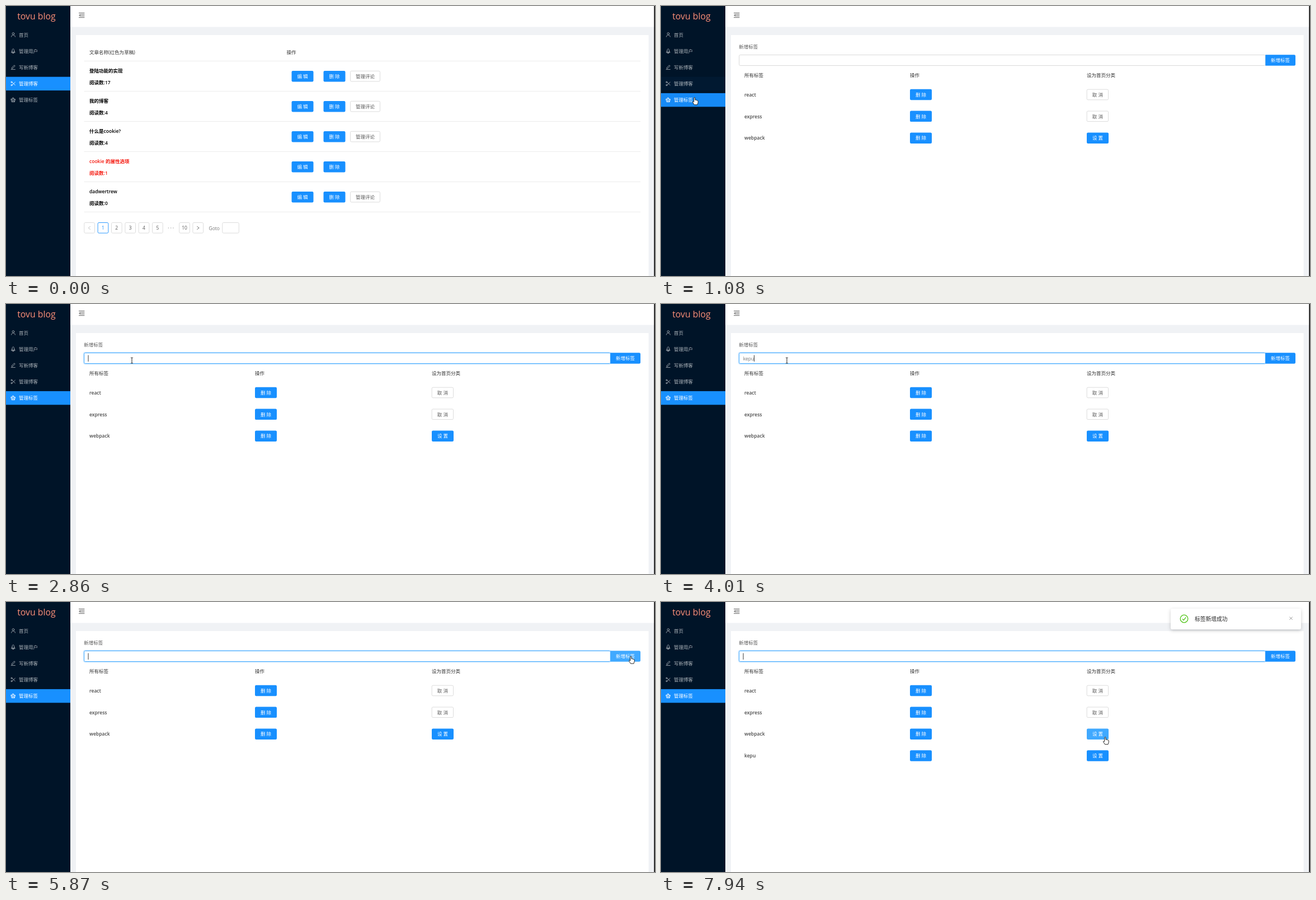
An HTML page that plays this animation: 1160x483 px, repeating every 8 s.

```html
<!DOCTYPE html>
<html lang="zh-CN">
<head>
<meta charset="utf-8">
<title>博客管理</title>
<style>
html, body { margin: 0; width: 100%; height: 100%; overflow: hidden; background: #fff; }
svg { display: block; width: 1160px; height: 483px; }
text { font: 8.53px "Open Sans", "Noto Sans CJK SC", "Noto Sans CJK", sans-serif; white-space: pre; }
.bold { font-weight: 600; }
.icon { fill: none; stroke: currentColor; stroke-width: .85; stroke-linejoin: round; stroke-linecap: round; }
</style>
</head>
<body>
<svg id="stage" viewBox="0 0 1160 483"></svg>
<script>
const LOOP = 8000, STEP = 77.16;
const BLUE = '#1890ff', HOVER = '#40a9ff', PRESSED = '#096dd9', BORDER = '#d9d9d9', GREY = '#595959', DARK = '#333';

// Drawing helpers; y of a label is its vertical centre.
const label = (x, y, s, fill = GREY, extra = '') =>
  `<text x="${x}" y="${y + 3.2}" fill="${fill}" ${extra}>${s}</text>`;
const centred = (x, y, s, fill) => label(x, y, s, fill, 'text-anchor="middle"');
const rect = (x, y, w, h, fill, extra = '') =>
  `<rect x="${x}" y="${y}" width="${w}" height="${h}" fill="${fill}" ${extra}/>`;
const frame = (x, y, w, h, stroke = BORDER) =>
  rect(x + .5, y + .5, w - 1, h - 1, '#fff', `rx="2" stroke="${stroke}" stroke-width=".9"`);
const icon = (x, y, d, color) =>
  `<path class="icon" transform="translate(${x} ${y})" color="${color}" d="${d}"/>`;
const primary = (x, y, s, id = '') =>
  rect(x, y - 9.7, 39, 19.5, BLUE, `rx="2.2" id="${id}"`) + centred(x + 19.5, y, s, '#fff');
const plain = (x, y, w, s) => frame(x, y - 9.8, w, 19.6) + centred(x + w / 2, y, s, GREY);

const menu = [
  ['首页', 'M2.1-1.8a1.9 1.9 0 1 1-3.8 0a1.9 1.9 0 1 1 3.8 0M-3.3 3.8C-3.2-.6 3.5-.6 3.6 3.8'],
  ['管理用户', 'M-1.8 1.8V-1.6Q-1.5-3.3 0-4Q1.5-3.3 1.8-1.6V1.8ZM-1.8 0L-3.2 2V2.8H3.2V2L1.8 0M-.9 4H.9'],
  ['写新博客', 'M-3.6 3.8H3.6M-2.6 2L-2.2.2L2-3.8L3.4-2.4L-.8 1.7Z'],
  ['管理博客', 'M-2-2.6L3.5 2.6M-2 2.6L3.5-2.6M-1.7-2.7a1.1 1.1 0 1 1-2.2 0a1.1 1.1 0 1 1 2.2 0M-1.7 2.7a1.1 1.1 0 1 1-2.2 0a1.1 1.1 0 1 1 2.2 0'],
  ['管理标签', 'M0-3.8L3.8-1L2.4 3.5H-2.4L-3.8-1ZM0-1.8L1.8-.4L1.1 1.6H-1.1L-1.8-.4ZM0-3.8V-1.8M3.8-1L1.8-.4M-3.8-1L-1.8-.4M2.4 3.5L1.1 1.6M-2.4 3.5L-1.1 1.6']
];
const menuY = i => 51.3 + 29.2 * i;

const sidebar = rect(0, 0, 115, 483, '#001428') +
  `<text x="54.5" y="23.5" text-anchor="middle" fill="#ff8f78" style="font-size:15.8px">tovu blog</text>` +
  rect(0, menuY(3) - 12.2, 115, 24.4, BLUE, 'id="oldItem"') +
  rect(0, menuY(4) - 12.2, 115, 24.4, BLUE, 'id="newItem"') +
  menu.map(([s, d], i) => `<g id="item${i}" opacity=".66">` +
    icon(12.8, menuY(i), d, '#fff') + label(23, menuY(i), s, '#fff') + '</g>').join('');

const shell = rect(0, 0, 1160, 483, '#f0f2f5') + rect(115, 0, 1045, 37.5, '#fff') +
  rect(125, 52, 1023.5, 431, '#fff') +
  icon(130, 12, 'M.5.5H10M4.3 3.2H10M4.3 5.9H10M.5 8.6H10M2.6 3L.7 4.6L2.6 6.2Z', '#444');

const posts = [['登陆功能的实现', 17], ['我的博客', 4], ['什么是cookie?', 4], ['cookie 的属性选项', 1], ['dadwertrew', 0]];
const rule = y => rect(139.5, y, 994.5, 1, '#ececec');
const postRow = ([name, reads], i) => {
  const y = 54 * i, draft = i === 3, color = draft ? '#f5160c' : '#000';
  return label(149, 115.3 + y, name, color, 'class="bold"') +
    label(149, 136.7 + y, '阅读数:' + reads, color, 'class="bold"') +
    primary(510.5, 125.6 + y, '编 辑') + primary(567.5, 125.6 + y, '删 除') +
    (draft ? '' : plain(615, 125.6 + y, 54, '管理评论')) + rule(152 + y);
};
const pageX = i => 139.3 + 24.35 * i;
const pager = [1, 2, 3, 4, 5].map(n =>
    frame(pageX(n), 387, 19.7, 19.7, n === 1 ? BLUE : BORDER) +
    centred(pageX(n) + 9.8, 397, n, n === 1 ? BLUE : GREY)).join('') +
  frame(pageX(0), 387, 19.7, 19.7) + icon(149, 397, 'M1.6-2.6L-1.8 0L1.6 2.6', '#bbb') +
  [290.5, 294.7, 298.9].map(x => `<circle cx="${x}" cy="397" r=".85" fill="#b5b5b5"/>`).join('') +
  frame(309.2, 387, 19.7, 19.7) + centred(319, 397, 10, GREY) +
  frame(333.4, 387, 19.7, 19.7) + icon(343.3, 397, 'M-1.6-2.6L1.8 0L-1.6 2.6', GREY) +
  label(362.5, 397.3, 'Goto', '#777') + frame(386.3, 387, 30.5, 19.7);
const postsPage = `<g id="postsPage">` + label(149, 82.8, '文章名称(红色为草稿)', DARK) +
  label(501.5, 82.8, '操作', DARK) + rule(98) + posts.map(postRow).join('') + pager + '</g>';

const tagRow = (name, i) => {
  const y = 158.5 + 38.8 * i;
  return `<g id="tag${i}">` + label(149, y, name, '#4a4a4a', 'class="bold"') + primary(445, y, '删 除') +
    (i < 2 ? plain(760.7, y, 39.3, '取 消') : primary(761, y, '设 置', 'set' + i)) + '</g>';
};
const tagsPage = `<g id="tagsPage">` + label(139.3, 73, '新增标签') +
  rect(138.7, 86.5, 942.6, 21, 'none', `rx="2.8" stroke="${BLUE}" stroke-opacity=".22" stroke-width="1.3" id="glow"`) +
  rect(139.7, 87.5, 940.6, 19, '#fff', `rx="2" stroke="${BORDER}" id="field"`) +
  label(146.8, 97.5, '', '#777', 'id="typed"') + rect(147, 91.5, .9, 11.5, '#222', 'id="caret"') +
  `<path id="add" fill="${BLUE}" d="M1080.3 87.2H1131.8q2.2 0 2.2 2.2V104.6q0 2.2-2.2 2.2H1080.3Z"/>` +
  centred(1107, 97.2, '新增标签', '#fff') +
  label(149, 123.3, '所有标签', DARK) + label(445, 123.3, '操作', DARK) + label(761, 123.3, '设为首页分类', DARK) +
  ['react', 'express', 'webpack', 'kepu'].map(tagRow).join('') + '</g>';

const notice = `<g id="notice"><g style="filter:drop-shadow(0 2px 3px rgba(0,0,0,.2))">` +
  rect(911, 12, 233, 37, '#fff', 'rx="2.4"') + '</g>' +
  `<circle cx="935" cy="30" r="6.8" fill="none" stroke="#52c41a" stroke-width="1.3"/>` +
  `<path d="M931.9 30.1L934.2 32.5L938.2 27.4" fill="none" stroke="#52c41a" stroke-width="1.3"/>` +
  `<text x="954" y="33.6" fill="#262626" style="font-size:9.75px">标签新增成功</text>` +
  icon(1126, 29.2, 'M-2.4-2.4L2.4 2.4M2.4-2.4L-2.4 2.4', '#8c8c8c') + '</g>';

// Pointer shapes have their hot spot at 0,0.
const pointers = `<g id="pointer" stroke-linejoin="round">
  <path id="arrow" fill="#fff" stroke="#111" stroke-width=".9" d="M0 0V9.6L2.2 7.6L3.7 11.2L5.3 10.5L3.8 7H6.8Z"/>
  <path id="hand" fill="#fff" stroke="#111" stroke-width=".9" d="M-1.2 8V.8Q0-.8 1 .8V4.6Q2.2 4 2.8 5Q4 4.5 4.6 5.5Q6 5.2 6.2 6.6V9.5L5 13.2H-.6L-3.5 8.4Q-3.3 6.4-1.2 8Z"/>
  <path id="beam" fill="none" stroke="#222" stroke-width="1" d="M-2-5H-.6L0-4.4L.6-5H2M0-4.4V4.4M-2 5H-.6L0 4.4L.6 5H2"/></g>`;

document.getElementById('stage').innerHTML =
  shell + sidebar + postsPage + tagsPage + notice + rect(1158.3, 0, 1.7, 483, '#111') + pointers;

const el = Object.fromEntries([...document.querySelectorAll('[id]')].map(n => [n.id, n]));
const show = (node, on) => node.setAttribute('visibility', on ? 'inherit' : 'hidden');
const clamp = v => Math.min(1, Math.max(0, v));
const smooth = v => v * v * (3 - 2 * v);

// time, x, y of the pointer
const path = [
  [70, 787, 391], [230, 600, 345], [380, 370, 270], [530, 190, 212], [690, 76, 176], [840, 60, 163.5],
  [1320, 60, 163.5], [1470, 120, 140], [1620, 205, 106], [1710, 225, 101],
  [4620, 225, 101], [4700, 330, 88], [4780, 600, 50], [4860, 930, 24], [4940, 1110, 60], [5010, 1136, 115],
  [5085, 1099, 134.5], [5250, 1099, 134.5], [5470, 1114, 108], [5550, 1117, 97],
  [6240, 1117, 97], [6470, 1116, 101], [6700, 1114, 104], [6940, 1080, 122], [7090, 1064, 125],
  [7250, 1064, 125], [7400, 990, 165], [7480, 938, 190], [7640, 830, 232], [7720, 794, 241.5], [8000, 794, 241.5]
];
const caretOn = [[1770, 2300], [2840, 3310], [3530, 4530], [5070, 5600], [5850, 6390], [6920, 7450], [7920, 8000]];
const typing = [[3530, 'k'], [3760, 'ke'], [3990, 'kepu'], [5850, '']];

function pointerAt(t) {
  const i = Math.max(1, path.findIndex(p => p[0] >= t));
  const [a, b] = [path[i - 1], path[i]];
  const k = clamp((t - a[0]) / (b[0] - a[0]));
  return [a[1] + (b[1] - a[1]) * k, a[2] + (b[2] - a[2]) * k];
}

function render(time) {
  const t = time < 64 ? 0 : 70 + STEP * Math.floor((time - 64) / STEP);
  const [x, y] = pointerAt(t);
  const inside = (x0, y0, x1, y1) => x >= x0 && x <= x1 && y >= y0 && y <= y1;
  const tags = t >= 910;
  const onMenu = inside(0, 156, 115, 180);
  const onAdd = tags && inside(1080, 87, 1134, 107);
  const onSet = tags && inside(761, 226, 800, 246);
  const onField = tags && inside(139, 87, 1080, 107);

  show(el.postsPage, !tags);
  show(el.tagsPage, tags);
  const k = 1 - (1 - clamp((t - 910) / 250)) ** 3;
  el.oldItem.setAttribute('opacity', 1 - k);
  el.newItem.setAttribute('opacity', k);
  el.item3.setAttribute('opacity', 1 - .34 * k);
  el.item4.setAttribute('opacity', tags || onMenu ? 1 : .66);

  const focused = t >= 1770 && !(t > 5600 && t < 5850);
  show(el.glow, tags && focused);
  el.field.setAttribute('stroke', focused ? HOVER : BORDER);
  const word = typing.reduce((s, [at, v]) => t >= at ? v : s, '');
  el.typed.textContent = word;
  el.caret.setAttribute('x', 146.6 + (word ? el.typed.getComputedTextLength() : 0));
  show(el.caret, caretOn.some(([a, b]) => t >= a && t < b));

  el.add.setAttribute('fill', t > 5600 && t < 5700 ? PRESSED : onAdd ? HOVER : BLUE);
  el.set2.setAttribute('fill', onSet ? HOVER : BLUE);
  show(el.tag3, t >= 6680);
  const slide = smooth(clamp((t - 6660) / 240));
  show(el.notice, t >= 6680);
  el.notice.setAttribute('transform', `translate(${234 * (1 - slide)} 0)`);
  el.notice.setAttribute('opacity', slide);

  const hand = onMenu || onAdd || onSet;
  show(el.pointer, t >= 70);
  show(el.hand, t >= 70 && hand);
  show(el.beam, t >= 70 && onField && !hand);
  show(el.arrow, t >= 70 && !hand && !onField);
  el.pointer.setAttribute('transform', `translate(${x} ${y})`);
}

const start = performance.now();
function tick() {
  render((performance.now() - start) % LOOP);
  requestAnimationFrame(tick);
}
tick();
</script>
</body>
</html>
```
